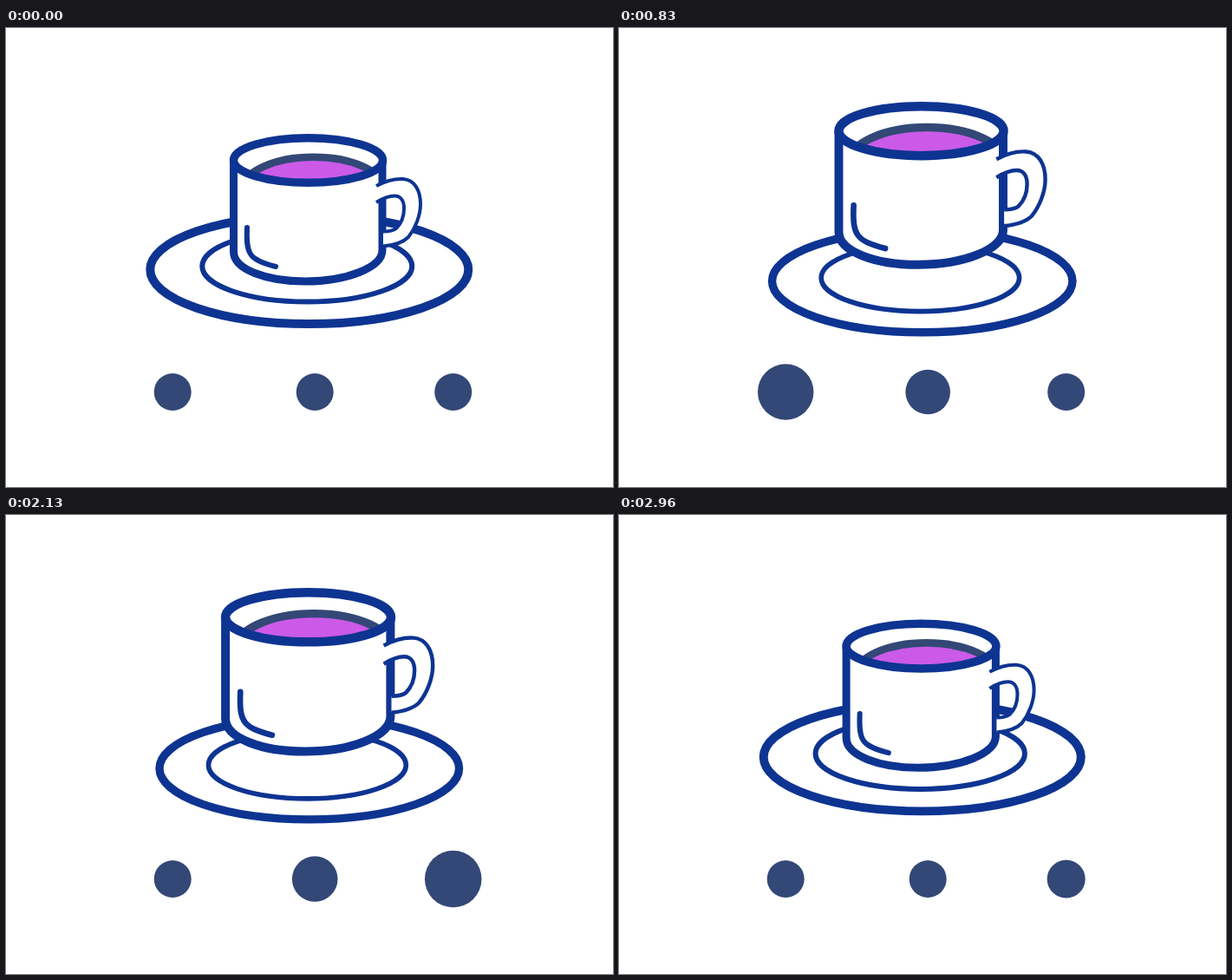
These frames come from a looping animation (700 px wide and 529 px high, 3000 ms). An HTML page with a canvas:

```html
<!DOCTYPE html>
<html lang="en">
<head>
<meta charset="utf-8">
<title>Cup loader</title>
<style>
  html, body { margin: 0; width: 100%; height: 100%; overflow: hidden; background: #fff; }
  canvas { display: block; }
</style>
</head>
<body>
<canvas id="stage" width="700" height="529"></canvas>
<script>
const ctx = document.getElementById('stage').getContext('2d');
const LOOP = 3000, FRAMES = 72;
const BLUE = '#0e3492', SLATE = '#334876', PURPLE = '#cb5ae8', WHITE = '#fff';

// Cubic bezier easing, solved for x by bisection
function bezier(x1, y1, x2, y2) {
  const at = (a, b, s) => 3 * a * s * (1 - s) ** 2 + 3 * b * s * s * (1 - s) + s ** 3;
  return x => {
    let lo = 0, hi = 1;
    for (let i = 0; i < 24; i++) {
      const mid = (lo + hi) / 2;
      if (at(x1, x2, mid) < x) lo = mid; else hi = mid;
    }
    return at(y1, y2, (lo + hi) / 2);
  };
}
const easeScale = bezier(0.167, 0.167, 0.667, 1);
const easeMove = bezier(0.167, 0.167, 0.31, 1);

function ellipse(x, y, rx, ry) {
  const p = new Path2D();
  p.ellipse(x, y, rx, ry, 0, 0, Math.PI * 2);
  return p;
}

const saucer = ellipse(349.75, 278.5, 183.5, 62.5);
const well = ellipse(347.25, 274.5, 121, 41);
const rim = ellipse(348.5, 152.5, 86, 25.75);
const drink = ellipse(354.5, 186.5, 82, 37.75);
const body = new Path2D('M262.5 152V258C262.5 278 300 292 345 292C393 292 434 276 434 256V152');
const shine = new Path2D('M278 230C276.5 262 281 267 311 275');
const outer = 'M427 182C438 176 450 173.5 458 174C471 175 478 187 478 203' +
  'C478 216 472 231 464 241C457 248 447 250.5 435 251.5';
const inner = 'M427 201C435 196 441 193.5 448 193.5C456 193.5 459 200 459 208' +
  'C459 218 455 226 450 231C446 234 441 234.5 435 234.5';
const handleEdges = new Path2D(outer + inner);
const handleFill = new Path2D(outer + 'L435 234.5C441 234.5 446 234 450 231' +
  'C455 226 459 218 459 208C459 200 456 193.5 448 193.5C441 193.5 435 196 427 201Z');

function fill(path, color) {
  ctx.fillStyle = color;
  ctx.fill(path);
}

function stroke(path, width, color = BLUE) {
  ctx.strokeStyle = color;
  ctx.lineWidth = width;
  ctx.stroke(path);
}

// Scale about (x, y) while shifting vertically
function placed(x, y, dy, scale, draw) {
  ctx.save();
  ctx.translate(x, y + dy);
  ctx.scale(scale, scale);
  ctx.translate(-x, -y);
  draw();
  ctx.restore();
}

function drawSaucer() {
  stroke(saucer, 10);
  stroke(well, 6);
}

function drawCup() {
  fill(body, WHITE);
  stroke(body, 9);
  fill(rim, WHITE);
  ctx.save();
  ctx.clip(rim);
  fill(drink, PURPLE);
  stroke(drink, 8.5, SLATE);
  ctx.restore();
  stroke(rim, 9.5);
  fill(handleFill, WHITE);
  stroke(handleEdges, 4);
  ctx.lineCap = 'round';
  stroke(shine, 6);
}

function drawDot(x, peak, t) {
  const grow = Math.max(0, 1 - Math.abs(t - peak) / 1000);
  const r = 21.5 + 12.9 * grow;
  fill(ellipse(x, 419.5, r, r), SLATE);
}

function render(t) {
  const x = 1 - Math.abs(t / (LOOP / 2) - 1);
  const s = easeScale(x), m = easeMove(x);
  ctx.fillStyle = WHITE;
  ctx.fillRect(0, 0, 700, 529);
  placed(349.75, 278.5, 15.5 * m, 1 - 0.08 * s, drawSaucer);
  placed(348.3, 209.25, -32.7 * m, 1 + 0.15 * s, drawCup);
  drawDot(192.2, 1000, t);
  drawDot(356.2, 1500, t);
  drawDot(515.7, 2000, t);
}

const start = performance.now();
function tick() {
  const t = Math.max(0, performance.now() - start) % LOOP;
  const step = LOOP / FRAMES;
  render(Math.floor((t + 4) / step) % FRAMES * step);
  requestAnimationFrame(tick);
}
tick();
</script>
</body>
</html>
```
